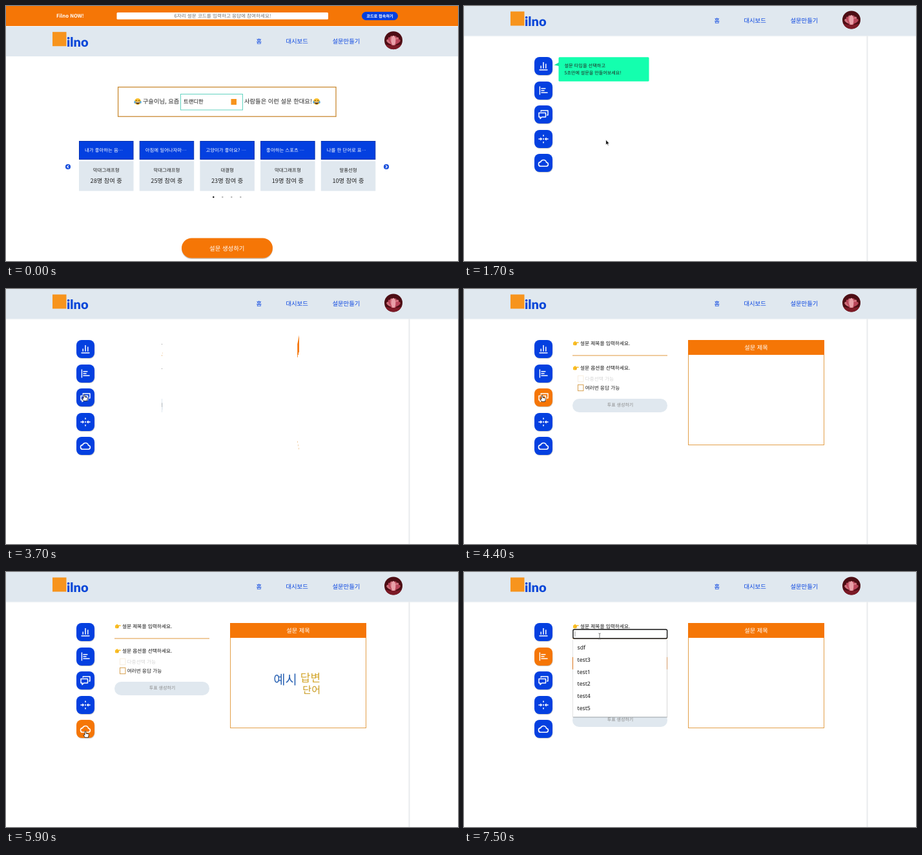
An HTML page for the animation above (8 s loop, 700 by 395 pixels).

```html
<!DOCTYPE html>
<html lang="ko">
<head>
<meta charset="utf-8">
<title>설문 만들기</title>
<style>
html, body { margin: 0; width: 100%; height: 100%; overflow: hidden; background: #fff; }
#stage { position: relative; width: 700px; height: 395px; overflow: hidden; background: #fff; }
svg { position: absolute; overflow: visible; }
text { font-family: "Noto Sans CJK KR", "Noto Sans CJK", "Noto Sans KR", sans-serif; white-space: pre; text-rendering: geometricPrecision; }
.logo { font-family: Lato, sans-serif; font-weight: 900; }
.list { font-family: "Noto Sans", sans-serif; }
</style>
</head>
<body>
<div id="stage"></div>
<script>
const LOOP = 8000, BLUE = '#0440e0', ORANGE = '#f57606', PALE = '#e0e8ef';
const PAGE_AT = 900, FLIP = 350, ICON_FLIP = 625, TINT = 270, OPEN_AT = 7450;
const CLICKS = [[2206, 0], [3695, 2], [5269, 4], [6631, 1]];
const stage = document.getElementById('stage');

// Drawing helpers, all in stage coordinates
const text = (x, y, size, str, fill = '#222', more = '') =>
  `<text x="${x}" y="${y}" font-size="${size}" fill="${fill}" ${more}>${str}</text>`;
const mid = (x, y, size, str, fill, more = '') => text(x, y, size, str, fill, 'text-anchor="middle" ' + more);
const rect = (x, y, w, h, fill, more = '') =>
  `<rect x="${x}" y="${y}" width="${w}" height="${h}" fill="${fill}" ${more}/>`;
const circle = (x, y, r, fill, more = '') => `<circle cx="${x}" cy="${y}" r="${r}" fill="${fill}" ${more}/>`;
const path = (d, fill, more = '') => `<path d="${d}" fill="${fill}" ${more}/>`;
const line = (d, color, width = 1, more = '') =>
  path(d, 'none', `stroke="${color}" stroke-width="${width}" ${more}`);
const group = (x, y, body, more = '') => `<g transform="translate(${x} ${y})" ${more}>${body}</g>`;

function layer(x, y, w, h, body) {
  stage.insertAdjacentHTML('beforeend',
    `<svg viewBox="${x} ${y} ${w} ${h}" width="${w}" height="${h}" style="left:${x}px;top:${y}px">${body}</svg>`);
  return stage.lastElementChild;
}

const laugh = (x, y) => group(x, y,
  circle(0, 0, 5.1, '#fbc02d') +
  path('M-3.2 .4H3.2Q2.8 4 0 4T-3.2 .4Z', '#5b3a1c') + rect(-2.6, .5, 5.2, 1, '#fff') +
  line('M-3.4 -1.2Q-2.2 -2.8 -1 -1.2M1 -1.2Q2.2 -2.8 3.4 -1.2', '#5b3a1c', .9) +
  `<ellipse cx="-4.5" cy="1" rx="1.2" ry="1.9" fill="#4aa8e8"/><ellipse cx="4.5" cy="1" rx="1.2" ry="1.9" fill="#4aa8e8"/>`);

const point = y => group(169, y,
  path('M0 -1.2L2.6 -3.3H4.4L4 -2H8.4Q9.4 -1.2 8.4 -.4H5.6Q6.4 .3 5.6 .9Q6.1 1.6 5.3 2.1Q5.4 3.1 4.2 3.1H1.6L0 2.4Z', '#fbbf24') +
  line('M3.4 -.4H5.6M3.6 .9H5.6M3.6 2.1H5.3', '#c98613', .4));

const header = y => group(0, y,
  rect(0, 0, 700, 46.3, PALE) +
  rect(72, 8.5, 21.5, 22, '#f7941d') +
  text(94, 31, 20, 'ilno', '#0a47d8', 'class="logo"') +
  text(387.6, 26.3, 9.3, '홈', BLUE, 'font-weight="500"') +
  text(433.5, 26.3, 9.3, '대시보드', BLUE, 'font-weight="500"') +
  text(505.5, 26.3, 9.3, '설문만들기', BLUE, 'font-weight="500"') +
  group(600, 21.5, circle(0, 0, 14, '#4d0d14') +
    [-68, -42, -18, 18, 42, 68, 0].map((a, i) =>
      `<ellipse cy="-3.5" rx="3.4" ry="8" fill="${i == 6 ? '#e9a0a8' : i % 2 ? '#b9465a' : '#d0707c'}" transform="translate(0 4) rotate(${a})"/>`).join('') +
    path('M-12.6 6A14 14 0 0 0 12.6 6Q0 9 -12.6 6Z', '#7c1a26')));

// Landing page
const cards = [
  ['내가 좋아하는 음⋯', '막대그래프형', 28], ['아침에 일어나자마⋯', '막대그래프형', 25],
  ['고양이가 좋아요? ⋯', '대결형', 23], ['좋아하는 스포츠 ⋯', '막대그래프형', 19],
  ['나를 한 단어로 표⋯', '말풍선형', 10]];
const card = ([title, type, count], i) => group(113 + i * 93.7, 0,
  rect(.5, 209.5, 83.5, 28, BLUE, 'stroke="#0430b0"') +
  text(9, 226, 7.4, title, '#fff', 'font-weight="500"') +
  rect(0, 240.5, 84.5, 46, PALE) +
  mid(42.2, 257, 7.4, type) + mid(42.2, 274, 9.2, count + '명 참여 중'));
const arrow = (x, dir) => circle(x, 249, 4.1, '#1a50dc') +
  line(`M${x - dir} 246.8L${x + dir * 1.2} 249L${x - dir} 251.2`, '#fff', 1.2);

const home = layer(0, 0, 700, 395,
  rect(0, 0, 700, 31, ORANGE) +
  text(78, 18, 7.7, 'Filno NOW!', '#fff', 'font-weight="700"') +
  rect(171.5, 10, 327.5, 10.7, '#fff', 'rx="1.5"') +
  mid(335.5, 18.2, 7.6, '6자리 설문 코드를 입력하고 응답에 참여하세요!', '#757575') +
  rect(551, 9, 56, 13, BLUE, 'rx="6.5"') +
  mid(579, 17.8, 6.2, '코드로 접속하기', '#fff', 'font-weight="700"') +
  header(31.7) +
  rect(173.6, 125.6, 337.4, 45.6, '#fff', 'stroke="#c98b34" stroke-width="1.3"') +
  laugh(204, 148) + laugh(481, 148) +
  text(211.8, 151.3, 9.3, '구슬이님, 요즘') +
  rect(270.5, 136.5, 96, 24.5, '#fff', 'stroke="#62d3c0"') +
  text(275, 151.3, 8.4, '트랜디한', '#111') +
  rect(348.5, 144, 8.5, 9, '#f7941d') +
  text(369, 151.3, 9.3, '사람들은 이런 설문 한대요!') +
  cards.map(card).join('') + arrow(96, -1) + arrow(589, 1) +
  [0, 1, 2, 3].map(i => circle(321.3 + i * 14, 296, 1.2, i ? '#b5b5b5' : '#111')).join('') +
  rect(272, 361, 141, 31, '#000', 'rx="15.5" opacity=".2"') +
  rect(272, 359.5, 141, 31, ORANGE, 'rx="15.5"') +
  mid(342.3, 378.8, 9.4, '설문 생성하기', '#fff', 'font-weight="500"'));

// Editor page
const page = layer(0, 0, 700, 395,
  header(0) + rect(0, 46.3, 700, 1, '#f0f3f6') + rect(623.5, 46.3, 2, 349, '#e9ebed'));
const tip = layer(0, 0, 700, 395,
  rect(146.5, 79.3, 140, 37.5, '#14ffae', 'rx="1.5"') + path('M139.5 91.5L147 87.5V93Z', '#14e5a0') +
  text(155.5, 95.3, 7.2, '설문 타입을 선택하고') + text(155.5, 105.5, 7.05, '5초만에 설문을 만들어보세요!'));

// Icon glyphs, centred on zero
const glyphs = [
  line('M-6.5 6H6.5M-3.8 3.8V-.5M0 3.8V-6M3.8 3.8V-3.5', '#fff', 1.5),
  line('M-5.6 -6.5V6.5M-3.6 -3.2H3.4M-3.6 0H1.6M-3.6 3.3H6.6', '#fff', 1.4),
  line('M-7 -2.5H3.5V4H-2.5L-5 6.5V4H-7ZM-3.8 -4.2V-6H7V1H5.2', '#fff', 1.5, 'stroke-linejoin="round"'),
  line('M0 -6.5V6.5', '#fff', 1.5, 'stroke-dasharray="2.6"') +
    line('M-7.6 0H-3M7.6 0H3', '#fff', 1.5) + path('M-4.6 -2.8L-1.8 0L-4.6 2.8ZM4.6 -2.8L1.8 0L4.6 2.8Z', '#fff'),
  line('M-4 5.2H4.2A3 3 0 0 0 4.6 -.8A4.7 4.7 0 0 0 -4.4 -1.4A3.3 3.3 0 0 0 -4 5.2Z', '#fff', 1.6)];
const icons = glyphs.map((g, i) => {
  const y = 79.3 + i * 37.5;
  return layer(108.5, y, 28, 28,
    rect(109, y + 1, 28, 28, '#000', 'rx="8" opacity=".2"') +
    rect(108.5, y, 28, 28, BLUE, 'rx="8" class="key"') + group(122.5, y + 14, g));
});

const label = (y, str) => point(y - 2.8) + text(180, y, 7.7, str, '#111', 'font-weight="500"');
const check = (y, str, more = '') => `<g ${more}>` +
  rect(176.5, y - 4.7, 8.4, 9.4, '#fff', 'stroke="#d6a050"') + text(187.5, y + 2.8, 7.7, str) + '</g>';
const submit = (y, h) => rect(168, y, 147, h, PALE, `rx="${h / 2}"`) +
  mid(242, y + h / 2 + 1, 7, '투표 생성하기', '#888');
const form = layer(168, 79, 147, 163,
  label(87, '설문 제목을 입력하세요.') + line('M168 103H315', '#e0973c') +
  '<g class="choice">' + label(125.3, '객관식 응답을 입력하세요.') +
  rect(168.5, 132.3, 146, 18, '#fff', 'stroke="#e0973c"') +
  rect(168, 132, 14, 18.5, ORANGE) + rect(302.5, 132, 12.5, 18.5, ORANGE) +
  mid(175, 143.6, 6.5, '1', '#fff') + mid(308.7, 144, 8, '+', '#fff', 'font-weight="700"') +
  text(184, 143.3, 6.4, '이곳에 항목을 입력하고 +버튼으로 추가하세', '#858585') +
  label(174, '설문 옵션을 선택하세요.') + check(189, '다중선택 가능') + check(203.5, '여러번 응답 가능') +
  submit(219.5, 20.5) + '</g>' +
  '<g class="open">' + label(125.3, '설문 옵션을 선택하세요.') +
  check(139, '다중선택 가능', 'opacity=".18"') + check(153, '여러번 응답 가능') + submit(170, 21) + '</g>');

const preview = layer(347, 79, 211, 163,
  rect(347.5, 79.5, 210, 162, '#fff', 'stroke="#e3a04a"') + rect(347, 79, 211, 23, ORANGE) +
  mid(452.5, 93.6, 9.2, '설문 제목', '#fff') +
  '<g class="words">' + mid(0, 0, 20, '예시', '#2f66b5') + mid(0, 0, 17, '답변', '#d3a52a') +
  mid(0, 0, 15, '단어', '#c99a1e') + '</g>');

const names = ['sdf', 'test3', 'test1', 'test2', 'test4', 'test5'];
const menu = layer(0, 0, 700, 395,
  rect(168.9, 89, 145.7, 14, '#fff', 'rx="2" stroke="#111" stroke-width="1.4"') +
  line('M172 92V100', '#777', .7) +
  rect(168.5, 105, 146.5, 120.5, '#000', 'opacity=".25"') + rect(168.9, 104, 145.5, 120.3, '#fff') +
  names.map((n, i) => text(175.5, 120 + i * 18.75, 8.7, n, '#111', 'class="list"')).join(''));

// Cursors, with the hot spot at zero
const edge = (fill, ink) => `stroke="${ink}" stroke-width=".8" stroke-linejoin="round" fill="${fill}"`;
const cursor = layer(0, 0, 700, 395, '<g class="cursor">' +
  `<path d="M0 0V8.2L1.9 6.5L3.2 9.2L4.5 8.6L3.3 6H5.7Z" ${edge('#111', '#fff')}/>` +
  `<path d="M-1 .8Q0 -.6 1 .8V3.6L4.4 4.2Q5.3 4.5 5.2 6L4.5 9.8H-.7L-3 6.2Q-2.6 4.9 -1 6Z" ${edge('#fff', '#111')}/>` +
  '<path d="M-1.6 -4.5Q0 -4.5 0 -3.5Q0 -4.5 1.6 -4.5M0 -3.5V3.5M-1.6 4.5Q0 4.5 0 3.5Q0 4.5 1.6 4.5" fill="none" stroke="#555" stroke-width=".8"/>' +
  '</g>').firstElementChild;
const route = [
  [300, 682, 388], [600, 373, 375], [850, 373, 375], [950, 374, 377], [1100, 374, 377],
  [2150, 120, 97.5], [3050, 120, 97.5], [3200, 121, 146], [3350, 121, 146], [3500, 121, 163.5],
  [4350, 121, 163.5], [5100, 123, 246.5], [5950, 123, 246.5], [6200, 119, 126.5],
  [7020, 119, 126.5], [7400, 210, 99.5]];

const clamp = v => Math.max(0, Math.min(1, v));
const smooth = v => v * v * (3 - 2 * v);
const mix = (a, b, p) => a + (b - a) * p;

// cubic-bezier(.25, .1, .25, 1)
function ease(x) {
  x = clamp(x);
  if (x === 0 || x === 1) return x;
  let lo = 0, hi = 1, u = .5;
  for (let i = 0; i < 24; i++) {
    u = (lo + hi) / 2;
    const v = 1 - u;
    if (.75 * v * u + u ** 3 < x) lo = u; else hi = u;
  }
  const v = 1 - u;
  return .3 * v * v * u + 3 * v * u * u + u ** 3;
}

const show = (el, on) => { el.style.display = on ? '' : 'none'; };

function flip(el, p) {
  el.style.transform = p < 1 ? `perspective(1200px) rotateY(${(p - 1) * 90}deg)` : 'none';
}

function drawCursor(t) {
  show(cursor, t >= route[0][0]);
  let i = route.length - 1;
  while (i > 0 && route[i][0] > t) i--;
  const a = route[i], b = route[Math.min(i + 1, route.length - 1)];
  const p = a === b ? 0 : smooth(clamp((t - a[0]) / (b[0] - a[0])));
  const x = mix(a[1], b[1], p), y = mix(a[2], b[2], p);
  const onKey = x > 108 && x < 137 && y > 79 && (y - 79.3) % 37.5 < 28;
  const onField = t > 7000 && x > 168 && y > 88 && y < 104;
  const kind = (t < PAGE_AT ? x < 412 : onKey) ? 1 : onField ? 2 : 0;
  cursor.setAttribute('transform', `translate(${x} ${y})`);
  [...cursor.children].forEach((c, k) => show(c, k === kind));
}

function drawWords(age) {
  const p = ease((age + 60) / 850);
  const spots = [[-22, 8], [22, 3], [24, 25]];
  [...preview.querySelector('.words').children].forEach((w, i) => {
    w.setAttribute('transform', `translate(${452 + spots[i][0] * p * .9} ${168 + spots[i][1] * p * .8})`);
    w.setAttribute('opacity', mix(.75, 1, p));
  });
}

function draw(t) {
  const onPage = t >= PAGE_AT;
  const click = CLICKS.filter(c => c[0] <= t).pop();
  show(home, !onPage);
  show(page, onPage);
  show(tip, t >= 940 && !click);
  show(menu, t >= OPEN_AT);
  const tint = click ? ease((t - click[0]) / TINT) : 0;
  icons.forEach((icon, i) => {
    show(icon, onPage);
    flip(icon, ease((t - PAGE_AT) / ICON_FLIP));
    const p = click && click[1] === i ? tint : 0;
    icon.querySelector('.key').setAttribute('fill', `rgb(${mix(4, 245, p)},${mix(64, 118, p)},${mix(224, 6, p)})`);
  });
  show(form, click);
  show(preview, click);
  if (click) {
    const age = t - click[0], turn = ease(age / FLIP), choice = click[1] < 2;
    flip(form, turn);
    flip(preview, turn);
    show(form.querySelector('.choice'), choice);
    show(form.querySelector('.open'), !choice);
    show(preview.querySelector('.words'), click[1] === 4);
    drawWords(age);
  }
  drawCursor(t);
}

const start = performance.now();
function tick() {
  draw((performance.now() - start) % LOOP);
  requestAnimationFrame(tick);
}
tick();
</script>
</body>
</html>
```
